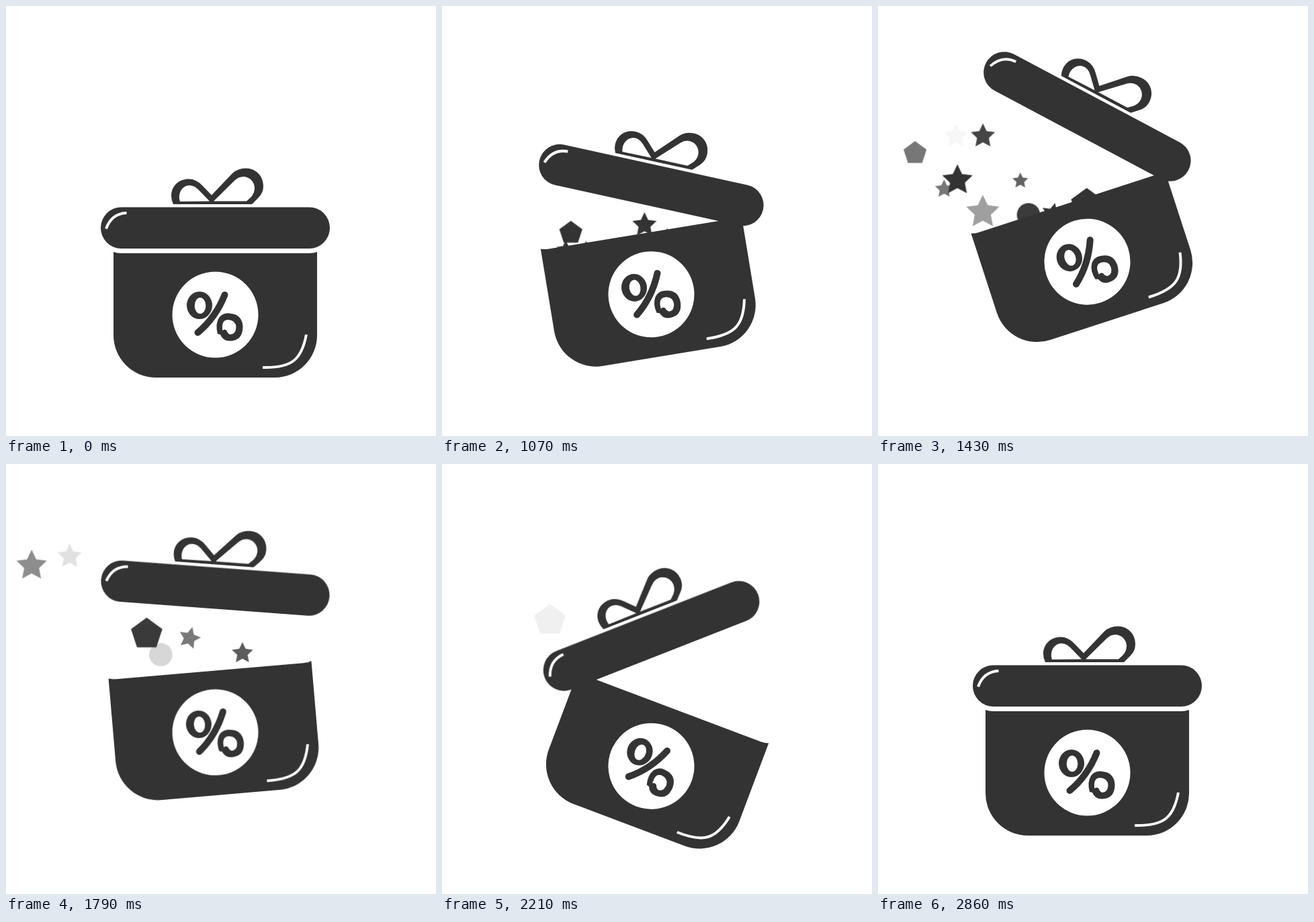
Write an HTML page without scripts that moves like this. It is 640x640 px and loops after 3570 ms.

```html
<!DOCTYPE html>
<html lang="en">
<head>
<meta charset="utf-8">
<title>Gift box</title>
<style>
  html, body { margin: 0; width: 100%; height: 100%; overflow: hidden; background: #fff; }
  svg { display: block; width: 100%; height: 100%; fill: #333; }
  .white { fill: #fff; }
  .line { fill: none; stroke: #fff; stroke-width: 4; }

  .box, .lid {
    animation-duration: 3570ms;
    animation-iteration-count: infinite;
    animation-timing-function: cubic-bezier(.37, 0, .63, 1);
  }
  .box { transform-origin: 311.5px 459.5px; animation-name: box-hop, box-tilt; }
  .lid { transform-origin: 311.5px 330px; animation-name: lid-hop, lid-tilt; }

  @keyframes box-hop {
    0%, 22.13% { translate: 0 0; }
    40.6%, 41.5% { translate: 0 -79px; }
    68.07%, 100% { translate: 0 0; }
  }
  @keyframes box-tilt {
    0%, 22.13% { rotate: 0deg; }
    37.5%, 41.2% { rotate: -18deg; }
    64.1%, 65.5% { rotate: 21.5deg; }
    80.1%, 100% { rotate: 0deg; }
  }
  @keyframes lid-hop {
    0%, 22.13% { translate: 0 0; }
    40.6%, 41.2% { translate: 0 -166px; }
    80.1%, 100% { translate: 0 0; }
  }
  @keyframes lid-tilt {
    0%, 22.4% { rotate: 0deg; }
    38.9% { rotate: 28.3deg; }
    61.9%, 65.5% { rotate: -21.4deg; }
    80.1%, 100% { rotate: 0deg; }
  }

  /* Confetti: --a start, --b rest, --s launch time, --e time fully faded, --r radius */
  .bit {
    scale: var(--r);
    animation: fly 3570ms var(--s) infinite both, fade 3570ms linear calc(var(--e) - 870ms) infinite both;
  }
  @keyframes fly {
    0% { translate: var(--a); animation-timing-function: cubic-bezier(.5, 1, .89, 1); }
    24.37%, 100% { translate: var(--b); }
  }
  @keyframes fade {
    0% { opacity: 0; }
    .01%, 11.2% { opacity: 1; }
    24.37%, 100% { opacity: 0; }
  }
</style>
</head>
<body>
<svg viewBox="0 0 640 640">
  <defs>
    <path id="star" d="M0-1 .288-.396 .951-.309 .466.151 .588.809 0 .49-.588.809-.466.151-.951-.309-.288-.396Z"/>
    <path id="pentagon" d="M0-1 .951-.309 .588.809-.588.809-.951-.309Z"/>
    <circle id="dot" r="1"/>
  </defs>

  <g>
    <use href="#star" class="bit" style="--a:233px 401px; --b:70px 113px; --s:1020ms; --e:1449ms; --r:19"/>
    <use href="#star" class="bit" style="--a:207px 387px; --b:61px 233px; --s:1000ms; --e:1743ms; --r:14.3"/>
    <use href="#star" class="bit" style="--a:243px 405px; --b:126px 273px; --s:1000ms; --e:1651ms; --r:25.8"/>
    <use href="#pentagon" class="bit" style="--a:245px 384px; --b:1px 172px; --s:970ms; --e:1743ms; --r:18"/>
    <use href="#star" class="bit" style="--a:340px 361px; --b:93px 136px; --s:1000ms; --e:1860ms; --r:18.9"/>
    <use href="#star" class="bit" style="--a:368px 365px; --b:158px 224px; --s:1000ms; --e:1790ms; --r:12.3"/>
    <use href="#star" class="bit" style="--a:195px 363px; --b:18px 124px; --s:1215ms; --e:2053ms; --r:23.8"/>
    <use href="#dot" class="bit" style="--a:205px 391px; --b:230.5px 283px; --s:1000ms; --e:1884ms; --r:17.3"/>
    <use href="#star" class="bit" style="--a:252px 336px; --b:278px 241px; --s:1300ms; --e:2103ms; --r:17; rotate:15deg"/>
    <use href="#star" class="bit" style="--a:372px 298px; --b:340px 272px; --s:1450ms; --e:2166ms; --r:16.6"/>
    <use href="#pentagon" class="bit" style="--a:322px 300px; --b:160px 232.5px; --s:1400ms; --e:2245ms; --r:24.5"/>
  </g>

  <g class="box">
    <path fill-rule="evenodd" d="M160 366Q165 368 172 368H451Q458 368 463 366V490A63 63 0 0 1 400 553H223A63 63 0 0 1 160 490Z
      M247.5 459.5a64 64 0 0 0 128 0a64 64 0 0 0-128 0Z"/>
    <ellipse cx="288" cy="445.5" rx="19" ry="20.5"/>
    <ellipse class="white" cx="289" cy="446" rx="8.3" ry="12"/>
    <path d="M325.5 430Q312 464 285.5 486" fill="none" stroke="#333" stroke-width="10" stroke-linecap="round"/>
    <path d="M315 488Q311 474 317 464Q323 456 333 457.5Q352 459 352.5 478Q352 498 334 498.5Q323 499 319 489Z"/>
    <path class="white" d="M322 480Q321 467 331 467Q342 468 342.5 478Q342 488.5 334 489Q330 488 328.5 483Q325 480 322 483Z"/>
    <path class="line" d="M382 538C426 539 440 526 447 489"/>
  </g>

  <g class="lid">
    <rect x="141" y="299.5" width="341" height="61.5" rx="30.75"/>
    <path class="line" d="M149 331.5Q157 309 179.5 308"/>
    <path fill-rule="evenodd" d="M249 295Q246 289 246 283C246 267 258 257.5 272 257.5Q283 257.5 292 267L306 281.5L337 249Q345 241.5 357 241.5C372 241.5 383 253 383 268Q383 278 376 285L366 295Z
      M259 291C255 278 263 267 273 267Q280 267 286 273L303 290.5Z
      M309 290.5L340 260Q346 254 353 254C363 254 370 262 370 271Q370 278 365 284L358 290.5Z"/>
  </g>
</svg>
</body>
</html>
```
